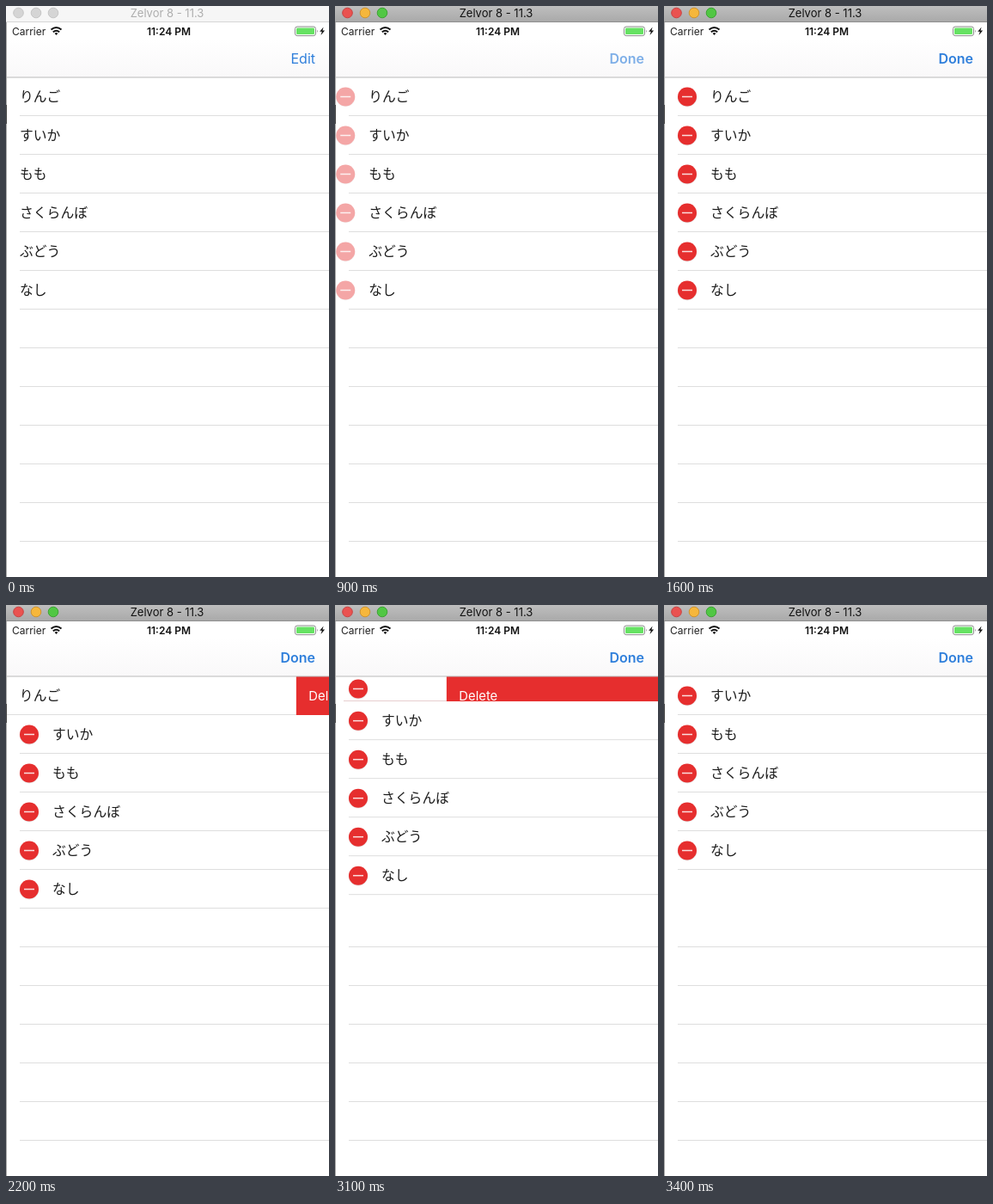
Recreate the animation shown at these times as an HTML page. Size 376 px wide and 664 px high, loop 3500 ms.

```html
<!DOCTYPE html>
<html lang="ja">
<head>
<meta charset="utf-8">
<title>List editing</title>
<style>
  html, body { margin: 0; width: 100%; height: 100%; overflow: hidden; background: #fff; }
  svg { display: block; width: 376px; height: 664px; }
  text { font-family: Inter, Roboto, sans-serif; }
  .item { font: 15.8px "Noto Sans CJK JP", "Noto Sans CJK", sans-serif; fill: #1c1c1c; }
  .sep { stroke: #dedede; }
  .nav { font-size: 16px; fill: #2f7fdb; text-anchor: end; }
</style>
</head>
<body>
<svg id="stage" viewBox="0 0 376 664">
  <defs>
    <linearGradient id="bar" x2="0" y2="1">
      <stop offset="0" stop-color="#bebebe"/><stop offset="1" stop-color="#a9a9a9"/>
    </linearGradient>
    <linearGradient id="navFill" x2="0" y2="1">
      <stop offset=".3" stop-color="#fff"/><stop offset="1" stop-color="#f9f8f9"/>
    </linearGradient>
    <clipPath id="rowClip"><rect id="clipBox" y="83" width="376" height="45"/></clipPath>
  </defs>
  <rect width="376" height="664" fill="#fff"/>

  <g id="list"></g>

  <rect y="19" width="376" height="64" fill="url(#navFill)"/>
  <path d="M0 83H376" stroke="#b9b9b9"/>
  <text id="edit" class="nav" x="360" y="67">Edit</text>
  <text id="done" class="nav" x="360" y="67" font-weight="600">Done</text>

  <text x="7" y="33.7" font-size="12" fill="#222">Carrier</text>
  <g fill="none" stroke="#111" stroke-width="2">
    <path d="M52.5 27.6Q58.5 22.4 64.5 27.6M54.8 30.3Q58.5 27.1 62.2 30.3"/>
    <path d="M56.6 31.7Q58.5 30.2 60.4 31.7L58.5 34Z" fill="#111" stroke="none"/>
  </g>
  <text x="189.5" y="33.7" font-size="12" font-weight="600" text-anchor="middle" fill="#111">11:24 PM</text>
  <rect x="336.5" y="24" width="24" height="10.6" rx="2.6" fill="#fff" stroke="#8c8c8c"/>
  <rect x="338" y="25.5" width="21" height="7.6" rx="1.3" fill="#66e263"/>
  <path d="M362 27.5q1.8 1.8 0 3.6z" fill="#8c8c8c"/>
  <path d="M369.6 24.5l-4.4 5.3h2.6l-1.3 4.3 4.6-5.6h-2.7z" fill="#111"/>

  <rect id="titleBar" width="376" height="18.5"/>
  <path id="titleEdge" d="M0 18.5H376"/>
  <g id="lights"></g>
  <text id="title" x="187.5" y="13" font-size="13" text-anchor="middle">Zelvor 8 - 11.3</text>
  <path d="M.5 19V664" stroke="#a9a9a9"/>
  <path d="M.5 115V137" stroke="#444"/>
</svg>
<script>
const LOOP = 3500, STEP = 100;
const TOP = 83, ROW = 45, RED = '#e62e2e';
const ITEMS = ['りんご', 'すいか', 'もも', 'さくらんぼ', 'ぶどう', 'なし'];
const LIGHTS = [[14.5, '#ea5250', '#c93f3f'], [35, '#f6b73c', '#cf9430'], [55, '#51c744', '#3da334']];

const $ = id => document.getElementById(id);
const set = (node, attrs) => {
  for (const k in attrs) node.setAttribute(k, attrs[k]);
  return node;
};
const add = (parent, tag, attrs = {}, label = '') => {
  const node = set(document.createElementNS('http://www.w3.org/2000/svg', tag), attrs);
  node.textContent = label;
  return parent.appendChild(node);
};
const ease = (t, start, length) => {
  const x = Math.min(1, Math.max(0, (t - start) / length));
  return x * x * (3 - 2 * x);
};
const move = (node, x, y = 0) => node.setAttribute('transform', `translate(${x} ${y})`);

function makeBadge(parent, y) {
  const g = add(add(parent, 'g'), 'g');
  add(g, 'circle', { cx: 0, cy: y + .7, r: 11.2, fill: '#000', opacity: .1 });
  add(g, 'circle', { cx: 0, cy: y, r: 11, fill: RED });
  add(g, 'path', { d: `M-6 ${y}H6`, stroke: '#fbdede', 'stroke-width': 1.5 });
  return g;
}

// The first row is clipped on its own; the rest slide up together.
const list = $('list');
const rest = add(list, 'g');
const first = add(list, 'g', { 'clip-path': 'url(#rowClip)' });
const rows = ITEMS.map((name, i) => {
  const parent = i ? rest : first, y = TOP + i * ROW;
  const badge = makeBadge(parent, y + 22.5);
  const text = add(parent, 'text', { class: 'item', y: y + 28 }, name);
  const sep = add(parent, 'path', { class: 'sep', d: `M16 ${y + 44.5}H376` });
  return { badge, text, sep };
});
for (let i = 6; i < 12; i++) {
  add(list, 'path', { class: 'sep', d: `M16 ${TOP + i * ROW + 44.5}H376` });
}
const action = add(first, 'g');
const actionBox = add(action, 'rect', { y: TOP, width: 700, height: ROW, fill: RED });
add(action, 'text', { x: 14.5, y: 110.7, 'font-size': 14.8, fill: '#fff' }, 'Delete');

const lights = LIGHTS.map(([cx]) => add($('lights'), 'circle', { cx, cy: 8, r: 5.8 }));

function draw(t) {
  const active = t >= 700;
  const editing = ease(t, 670, 400);
  const open = ease(t, 1950, 490);
  const gone = ease(t, 2940, 400);

  set($('titleBar'), { fill: active ? 'url(#bar)' : '#f6f6f6' });
  set($('titleEdge'), { stroke: active ? '#8f8f8f' : '#d6d6d6' });
  set($('title'), { fill: active ? '#111' : '#adadad' });
  lights.forEach((dot, i) => set(dot, {
    fill: active ? LIGHTS[i][1] : '#d5d5d5',
    stroke: active ? LIGHTS[i][2] : '#c6c6c6'
  }));
  set($('edit'), { opacity: Math.max(0, 1 - 2 * editing) });
  set($('done'), { opacity: editing });

  const height = ROW * (1 - gone);
  const shift = 74 * open + 489 * gone;
  rows.forEach(({ badge, text }, i) => {
    const dx = 38 * editing - (i ? 0 : shift);
    set(text, { x: 16 + dx });
    set(badge, { opacity: editing ** 1.75 });
    move(badge, -11 + dx);
  });
  if (gone) move(rows[0].badge, 27, (height - ROW) / 2);

  const edge = 376 - shift;
  const left = gone ? 10 : Math.max(0, 16 - shift);
  set(rows[0].sep, { d: `M${left} ${TOP + height - .5}H${Math.max(left, edge)}` });
  rows[0].sep.style.stroke = gone ? '#e3c6c8' : '';
  set($('clipBox'), { height });
  set(actionBox, { height });
  move(action, edge);
  move(rest, 0, -ROW * gone);
}

const began = performance.now();
function tick() {
  const t = (performance.now() - began) % LOOP;
  draw(Math.floor(t / STEP) * STEP);
  requestAnimationFrame(tick);
}
tick();
</script>
</body>
</html>
```
